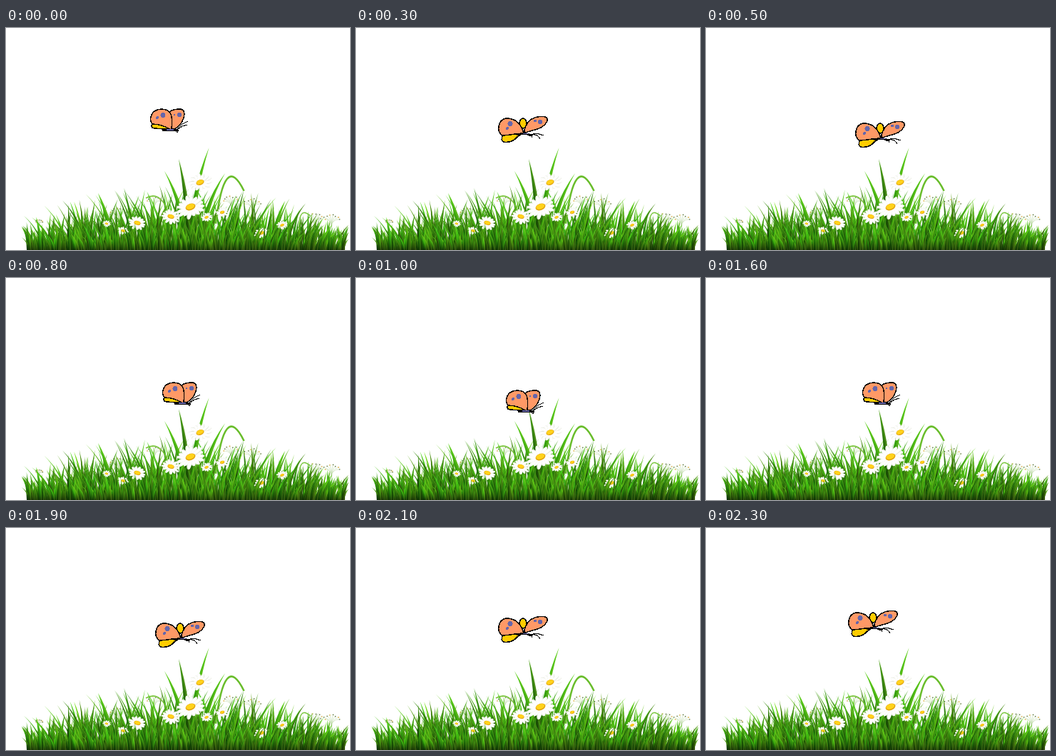
An HTML page with a canvas that plays this animation: 482x312 px, repeating every 2400 ms.

```html
<!DOCTYPE html>
<html lang="en">
<head>
<meta charset="utf-8">
<title>Butterfly over a meadow</title>
<style>
  html, body { margin: 0; width: 100%; height: 100%; overflow: hidden; background: #fff; }
  canvas, svg { position: absolute; left: 0; top: 0; width: 482px; height: 312px; }
  svg { shape-rendering: crispEdges; }
  .wing { fill: #ff9966; stroke: #000; stroke-width: 1.5; stroke-linejoin: round; }
  .hind { fill: #ffcc00; stroke: #000; stroke-width: 1.5; }
  .spot { fill: #6666aa; }
  .line { fill: none; stroke: #000; stroke-width: 1.2; }
  .body { fill: none; stroke: #000; stroke-width: 2.2; }
</style>
</head>
<body>
<canvas id="meadow" width="482" height="312"></canvas>
<svg viewBox="0 0 482 312">
  <g id="closed">
    <path class="hind" d="M4 20C2 26 3 28 8 28L20 29 29 29 18 20Z"/>
    <path class="wing" d="M28 5C31 2 38 1 44 1C49 2 50 7 48 13C46 20 41 26 35 29H29Z"/>
    <path class="wing" d="M30 30C22 25 15 22 4 22C0 17 1 9 7 4C13 0 23 0 28 5C32 10 33 22 30 30Z"/>
    <g class="spot">
      <circle cx="11" cy="13" r="2"/><circle cx="19" cy="9.5" r="3.5"/>
      <circle cx="35" cy="9" r="1.6"/><circle cx="42" cy="9" r="3"/>
    </g>
    <path class="body" d="M18 30.5H40"/>
    <path d="M24 29.8H34" stroke="#6666aa" stroke-width="1.4"/>
    <path class="line" d="M39 29L46 22 54 18M40 29L46 25 53 23M36 31L39 34 41 30"/>
  </g>
  <g id="open">
    <ellipse class="hind" cx="35" cy="11" rx="5" ry="7"/>
    <path class="hind" d="M8 27C4 31 4 36 9 37.3C16 38 23 35 27 30L33 26Z"/>
    <path class="wing" d="M36 25C27 25 14 28 6 28C2 25 0 20 1 15C2 8 7 4 13 4C24 4 33 12 36 25Z"/>
    <path class="wing" d="M37 25C36 18 41 9 47 5C54 1 64 0 68 3C71 7 67 13 60 17C52 21 44 21 37 25Z"/>
    <g class="spot">
      <circle cx="17" cy="11.5" r="3.6"/><circle cx="13" cy="18" r="2"/>
      <ellipse cx="59" cy="9" rx="3.5" ry="2.8"/><circle cx="52" cy="7.5" r="2"/>
    </g>
    <path class="body" d="M26 27L36 26 49 27"/>
    <path d="M35 25.5H43" stroke="#6666aa"/>
    <path class="line" d="M47 27C52 24 58 26 64 28M48 27C54 26 57 29 59 33M43 28H47L48 31"/>
  </g>
</svg>
<script>
const ctx = document.getElementById('meadow').getContext('2d');
const GROUND = 312;
let seed = 41;
const rand = (a = 0, b = 1) => {
  seed = (seed * 16807) % 2147483647;
  return a + (b - a) * seed / 2147483647;
};

// The meadow is a low mound: height of the grass along x
const mound = x => 28 + 62 * (1 - ((x - 246) / 235) ** 2);

function blade(base, tipX, tipY, width, hue, light) {
  const fill = ctx.createLinearGradient(0, tipY, 0, GROUND);
  fill.addColorStop(0, `hsl(${hue} 78% ${light + 9}%)`);
  fill.addColorStop(.5, `hsl(${hue + 3} 88% ${light - 5}%)`);
  fill.addColorStop(1, `hsl(${hue + 4} 85% 10%)`);
  const midX = base + (tipX - base) * .12, midY = GROUND - (GROUND - tipY) * .56;
  const half = (left, right, color) => {
    ctx.fillStyle = color;
    ctx.beginPath();
    ctx.moveTo(base + left, GROUND);
    ctx.quadraticCurveTo(midX + left, midY, tipX, tipY);
    ctx.quadraticCurveTo(midX + right, midY, base + right, GROUND);
    ctx.fill();
  };
  half(-width / 2, width / 2, fill);
  half(0, width / 2, 'rgba(190,235,60,.2)');
}

function grass(count, low, high, limit = 99) {
  for (let i = 0; i < count; i++) {
    const x = rand(31, 473);
    const tall = Math.min(limit, mound(x)) * rand(low, high);
    const lean = (x - 250) / 220 * .28 + rand(-.38, .38);
    const tip = Math.max(22, Math.min(480, x + lean * tall));
    blade(x, tip, GROUND - tall, rand(2.2, 4.6), rand(92, 108), rand(21, 42));
  }
}

function dot(x, y, rx, color, ry = rx) {
  ctx.fillStyle = color;
  ctx.beginPath();
  ctx.ellipse(x, y, rx, ry, 0, 0, 7);
  ctx.fill();
}

function curve(color, width, x0, y0, cx, cy, x1, y1) {
  ctx.strokeStyle = color;
  ctx.lineWidth = width;
  ctx.beginPath();
  ctx.moveTo(x0, y0);
  ctx.quadraticCurveTo(cx, cy, x1, y1);
  ctx.stroke();
}

function daisy(x, y, r) {
  ctx.save();
  ctx.translate(x, y);
  ctx.rotate(x < 240 ? .25 : -.35);
  ctx.scale(1, .76);
  const petals = Math.round(9 + r / 3);
  for (let i = 0; i < petals; i++) {
    ctx.save();
    ctx.rotate((i + rand(-.15, .15)) * 2 * Math.PI / petals);
    const len = r * rand(.85, 1.12);
    dot(len * .55, 0, len * .46, '#dfe3d3', r * .17);
    dot(len * .56, -r * .03, len * .45, '#fff', r * .14);
    ctx.restore();
  }
  dot(0, 0, r * .36, '#e0a00a', r * .3);
  dot(0, -r * .04, r * .31, '#ffd21c', r * .24);
  ctx.restore();
}

// Fine-stalked flower cluster
function umbel(x, y, r) {
  curve('#7fb65a', .7, x, y + r, x - 3, y + 25, x - 5, GROUND);
  for (let i = 0; i < 8; i++) {
    const a = Math.PI * (1 + i / 7), far = r * rand(.7, 1.1);
    const px = x + Math.cos(a) * far, py = y + Math.sin(a) * far * .6;
    curve('#b5d49d', .5, x, y + r, x, y, px, py);
    dot(px, py, 1.8, '#f2f4ea', 1.2);
    dot(px, py, .8, i % 3 ? '#56703c' : '#e2a92c');
  }
}

[[46, 273], [158, 259], [208, 243], [316, 243], [345, 247], [432, 268], [456, 269]]
  .forEach(([x, y]) => umbel(x, y, x < 60 ? 5 : 11));

grass(300, .55, 1.03);

// Tall leaves: base x, tip x, tip y
[[258, 284.5, 168], [257, 242, 184], [253, 222, 201], [272, 307, 204], [148, 129, 232], [374, 391, 243]]
  .forEach(([base, x, y], i) => blade(base, x, y, 8, 100, i === 1 ? 25 : 37));

// Arching leaves
curve('#69bd2b', 2.6, 294, 275, 306, 172, 333.5, 229);
curve('#78c63a', 1.6, 231, 272, 220, 226, 196, 239);
curve('#78c63a', 1.4, 411, 289, 409, 248, 426, 264);

grass(130, .4, .78);

[[141, 275, 6], [164, 285, 8], [303, 259, 9], [281, 266, 8], [387, 277, 8],
 [358, 288, 10], [184, 274, 13], [231, 265, 13], [272, 217, 16], [258.5, 251.5, 20]]
  .forEach(flower => daisy(...flower));

grass(330, .45, 1, 38);

// Flight keys: step, x, y; the way back retraces them
const flight = [[0, 0, 0], [3, 0, 12], [5, 10, 19], [8, 17, 33], [11, 4, 49], [12, -2, 52]];
function place(k, axis) {
  const i = Math.max(1, flight.findIndex(key => key[0] >= k));
  const from = flight[i - 1], to = flight[i];
  const part = (k - from[0]) / (to[0] - from[0]);
  return Math.round(from[axis] + (to[axis] - from[axis]) * part);
}

const poses = [
  { el: document.getElementById('closed'), x: 201, y: 113 },
  { el: document.getElementById('open'), x: 199, y: 111 }
];

function draw() {
  const step = Math.floor(performance.now() / 100) % 24;
  const k = 12 - Math.abs(12 - step);
  poses.forEach((pose, i) => {
    pose.el.style.display = step % 2 === i ? '' : 'none';
    pose.el.setAttribute('transform', `translate(${pose.x + place(k, 1)} ${pose.y + place(k, 2)})`);
  });
  requestAnimationFrame(draw);
}
draw();
</script>
</body>
</html>
```
